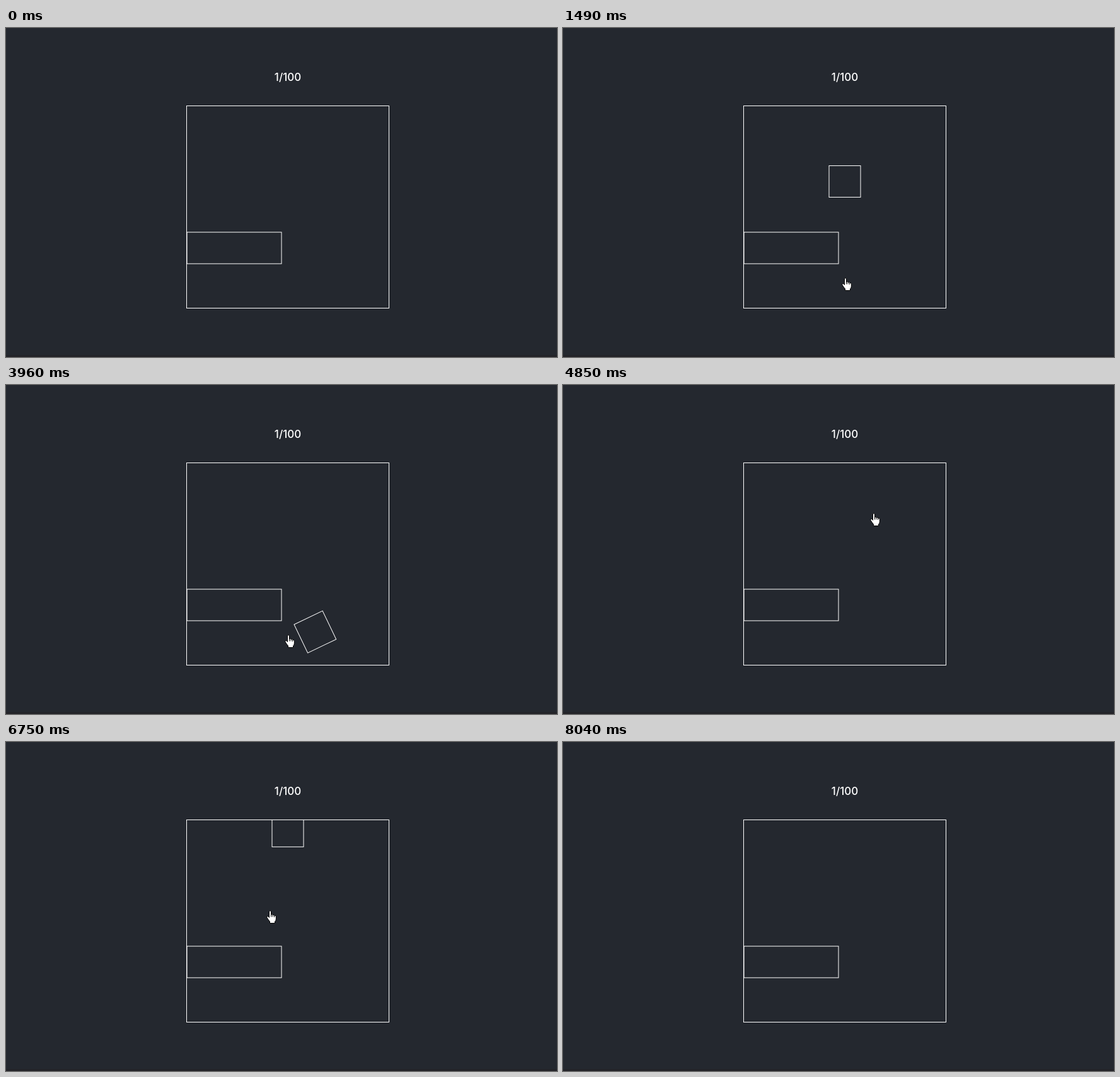
An HTML page that plays this animation: 874 px wide and 522 px high, repeating every 8.7 s.

```html
<!DOCTYPE html>
<html lang="en">
<head>
<meta charset="utf-8">
<title>Falling box</title>
<style>
  html, body { margin: 0; width: 100%; height: 100%; overflow: hidden; background: #24282f; }
  svg { display: block; }
  text { font: 500 17px Inter, Roboto, sans-serif; fill: #fff; text-anchor: middle; }
  .wire { fill: none; stroke: #fff; stroke-width: 1; }
</style>
</head>
<body>
<svg width="874" height="522" viewBox="0 0 874 522">
  <defs>
    <clipPath id="arena"><rect x="287" y="124" width="320" height="320"/></clipPath>
  </defs>
  <rect width="874" height="522" fill="#24282f"/>
  <rect y="519" width="874" height="3" fill="#232328"/>
  <text x="447" y="84">1/100</text>
  <rect class="wire" x="286.5" y="123.5" width="321" height="321"/>
  <g clip-path="url(#arena)">
    <rect class="wire" x="287" y="324" width="150" height="50"/>
    <rect class="wire" id="box" x="-25" y="-25" width="50" height="50"/>
  </g>
  <g id="cursor">
    <g id="hand" stroke="#000">
      <path fill="#fff" d="M-.5 .5Q1-1 2.5 .5V6Q4.5 4.8 5 6.5Q7 5.5 7.7 7.3Q10 6.6 10.4 9V13Q10 16 8.5 17V19.5H.5V17Q-2 14-4 10.5Q-4.6 8-2.5 8.5L-.5 10.5Z"/>
      <path fill="none" d="M2.5 6V9.5M5 6.5V9.5M7.7 7.3V10"/>
    </g>
    <path id="arrow" fill="#000" stroke="#fff" d="M.5 .5V19L4.7 15.2L7.5 21.3L10.4 20L7.8 14H13Z"/>
  </g>
  <circle id="press" r="12" fill="#ff0" fill-opacity=".47"/>
</svg>
<script>
const LOOP = 8700;
const GRAVITY = 0.000952;  // px per ms squared
const IMPACT = 606;        // ms from release until the box meets the ledge
const DRAG = 0.005;        // px per ms of falling speed lost on impact
const SLIDE = 0.299;       // px per ms after impact
const SPIN = 0.444;        // degrees per ms after impact
const FALL = 870;

const clicks = [
  { down: 840, up: 990, drop: 990 },
  { down: 2830, up: 3020, drop: 3210 },
  { down: 6430, up: 6560, drop: 6560 }
];

const home = [447, 397], left = [280, 180], upper = [396, 240], lower = [558, 442];
const moves = [
  { start: 90, end: 520, path: [[590, 519], home] },
  { start: 4160, end: 5420, path: [home, [728, 340], [640, 180], left] },
  { start: 5570, end: 6240, path: [left, [155, 230], [239, 338], upper] },
  { start: 6700, end: 7280, path: [upper, lower] },
  { start: 7420, end: 8040, path: [lower, [790, 524]] }
];
const enter = moves[0].start, leave = moves[moves.length - 1].end;

const $ = id => document.getElementById(id);
const [box, cursor, hand, arrow, press] = ["box", "cursor", "hand", "arrow", "press"].map($);
const show = (el, on) => el.setAttribute("visibility", on ? "visible" : "hidden");
const place = (el, x, y, angle = 0) =>
  el.setAttribute("transform", `translate(${x} ${y}) rotate(${angle})`);
const easeOut = u => Math.sin(u * Math.PI / 2);
const mix = (a, b, u) => a.map((v, i) => v + (b[i] - v) * u);

// De Casteljau: works for straight and curved paths alike
function bezier(points, u) {
  if (points.length === 1) return points[0];
  return bezier(points.slice(1).map((p, i) => mix(points[i], p, u)), u);
}

function pointerAt(t) {
  const { start, end, path } = moves.filter(m => t >= m.start).pop() || moves[0];
  const u = Math.min(1, Math.max(0, (t - start) / (end - start)));
  return bezier(path, easeOut(u)).map(Math.round);
}

function drawBox(t) {
  const click = clicks.find(({ drop }) => t >= drop && t < drop + FALL);
  show(box, click);
  if (!click) return;
  const age = t - click.drop, after = Math.max(0, age - IMPACT);
  const y = 124 + GRAVITY * age * age / 2 - DRAG * after;
  place(box, 447 + SLIDE * after, y, SPIN * after);
}

function drawPointer(t) {
  const [x, y] = pointerAt(t);
  const present = t >= enter && t < leave;
  const inside = x >= 286 && x < 608 && y >= 123 && y < 445;
  place(cursor, x, y);
  show(hand, present && inside);
  show(arrow, present && !inside);
  place(press, x, y);
  show(press, clicks.some(({ down, up }) => t >= down && t < up));
}

const began = performance.now();
function tick() {
  const t = (performance.now() - began) % LOOP;
  drawBox(t);
  drawPointer(t);
  requestAnimationFrame(tick);
}
tick();
</script>
</body>
</html>
```
